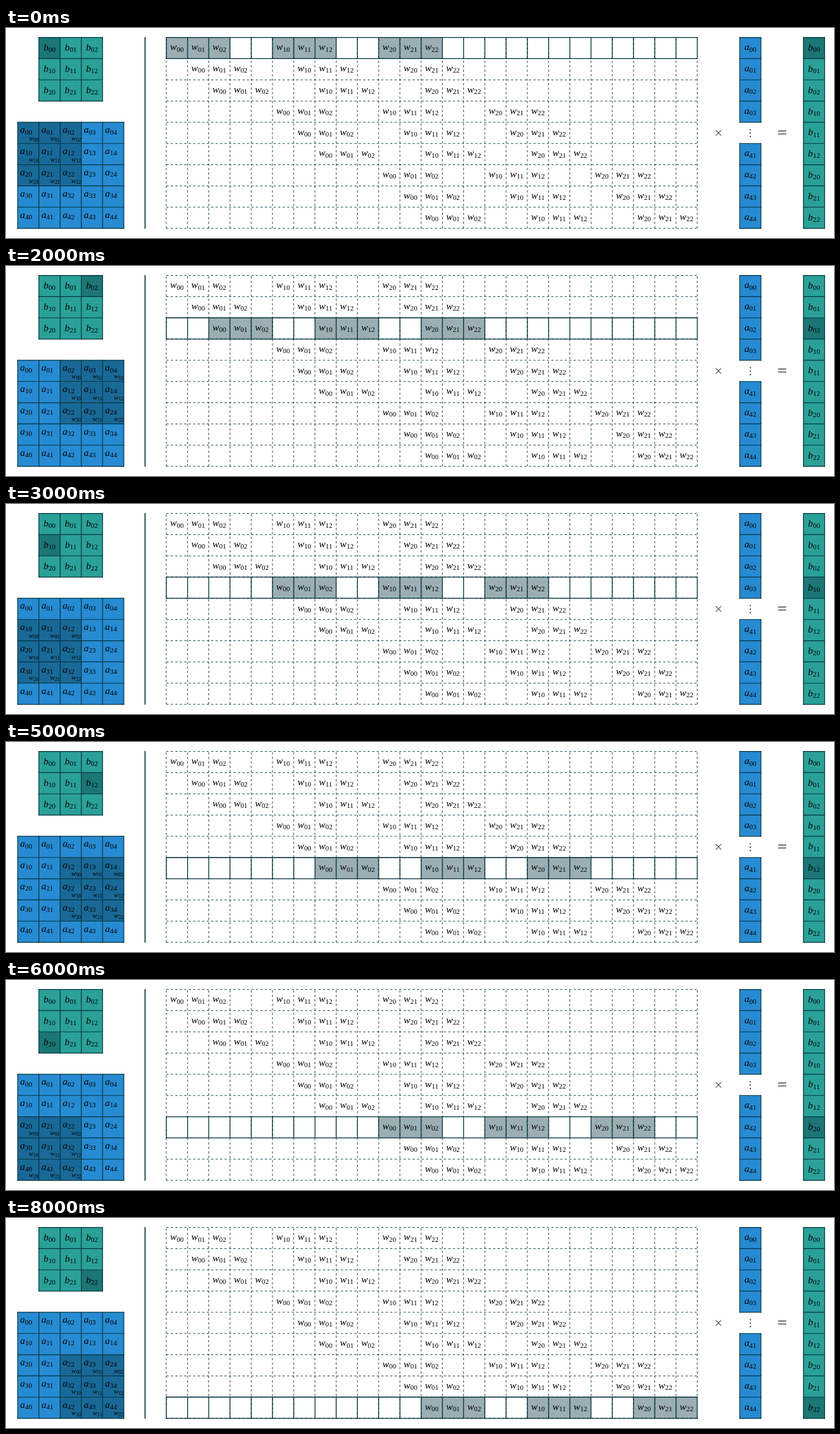
Write an HTML page with a canvas that moves like this. It is 1280x325 px and loops after 9000 ms.

```html
<!DOCTYPE html>
<html lang="en">
<head>
<meta charset="utf-8">
<title>Convolution as a matrix product</title>
<style>
  html, body { margin: 0; width: 100%; height: 100%; overflow: hidden; background: #fff; }
  canvas { display: block; }
</style>
</head>
<body>
<canvas id="stage" width="1280" height="325"></canvas>
<script>
const ctx = document.getElementById('stage').getContext('2d');
const CELL = 32.83, LEFT = 18, TOP = 14.6;
const BLUE = '#268bd2', TEAL = '#2aa198', INK = '#073642';
const SHADE = 'rgba(7, 54, 66, 0.4)';
const STEP_MS = 1000, STEPS = 9;

// Everything sits on one lattice of square cells.
const px = col => LEFT + col * CELL;
const py = row => TOP + row * CELL;
const digits = (row, col) => `${row}${col}`;

function each(rows, cols, visit) {
  for (let r = 0; r < rows; r++) for (let c = 0; c < cols; c++) visit(r, c);
}

function fill(col, row, cols, rows, color) {
  ctx.fillStyle = color;
  ctx.fillRect(px(col), py(row), cols * CELL, rows * CELL);
}

function line(x1, y1, x2, y2) {
  ctx.beginPath();
  ctx.moveTo(x1, y1);
  ctx.lineTo(x2, y2);
  ctx.stroke();
}

function grid(col, row, cols, rows, width = 1.2, dash = []) {
  ctx.strokeStyle = INK;
  ctx.lineWidth = width;
  ctx.lineCap = dash.length ? 'butt' : 'square';
  ctx.setLineDash(dash);
  for (let r = 0; r <= rows; r++) line(px(col), py(row + r), px(col + cols), py(row + r));
  for (let c = 0; c <= cols; c++) line(px(col + c), py(row + rows), px(col + c), py(row));
  ctx.setLineDash([]);
}

// Letter with a subscript; align is 0 for left, 0.5 for centre, 1 for right.
function symbol(letter, sub, x, baseline, align = 0.5, size = 15.3) {
  const letterFont = `italic ${size}px "Liberation Serif", serif`;
  const subFont = `${size * 0.71}px "Liberation Serif", serif`;
  ctx.fillStyle = '#000';
  ctx.font = subFont;
  const subWidth = ctx.measureText(sub).width;
  ctx.font = letterFont;
  const letterWidth = ctx.measureText(letter).width;
  const start = x - align * (letterWidth + subWidth);
  ctx.fillText(letter, start, baseline);
  ctx.font = subFont;
  ctx.fillText(sub, start + letterWidth, baseline + size * 0.15);
}

function cellSymbol(letter, sub, col, row) {
  symbol(letter, sub, px(col + 0.5), py(row + 0.5) + (letter === 'b' ? 4 : 3.2));
}

function drawOutputGrid(i, j) {
  fill(1, 0, 3, 3, TEAL);
  fill(1 + j, i, 1, 1, SHADE);
  grid(1, 0, 3, 3);
  each(3, 3, (r, c) => cellSymbol('b', digits(r, c), 1 + c, r));
}

function drawInputGrid(i, j) {
  fill(0, 4, 5, 5, BLUE);
  fill(j, 4 + i, 3, 3, SHADE);
  grid(0, 4, 5, 5);
  each(5, 5, (r, c) => symbol('a', digits(r, c), px(c) + 3.8, py(4 + r) + 16.4, 0));
  each(3, 3, (r, c) =>
    symbol('w', digits(r, c), px(j + c + 1) - 0.6, py(4 + i + r) + 28, 1, 10.8));
}

function drawMatrix(step) {
  const first = 7;
  const weightCol = (row, m, n) => first + 5 * (Math.floor(row / 3) + m) + row % 3 + n;
  for (let m = 0; m < 3; m++) fill(weightCol(step, m, 0), step, 3, 1, SHADE);
  grid(first, 0, 25, 9, 0.9, [3.46, 3.46]);
  grid(first, step, 25, 1, 1.3);
  for (let row = 0; row < 9; row++) {
    each(3, 3, (m, n) => cellSymbol('w', digits(m, n), weightCol(row, m, n), row));
  }
}

function drawInputVector() {
  for (const [row, a] of [[0, 0], [5, 4]]) {
    fill(34, row, 1, 4, BLUE);
    grid(34, row, 1, 4);
    for (let k = 0; k < 4; k++) cellSymbol('a', digits(a, a ? k + 1 : k), 34, row + k);
  }
}

function drawOutputVector(step) {
  fill(37, 0, 1, 9, TEAL);
  fill(37, step, 1, 1, SHADE);
  grid(37, 0, 1, 9);
  each(3, 3, (r, c) => cellSymbol('b', digits(r, c), 37, 3 * r + c));
}

function drawOperators() {
  const y = py(4.5);
  ctx.strokeStyle = INK;
  ctx.lineCap = 'butt';
  ctx.lineWidth = 1.6;
  line(px(6), py(0) - 0.5, px(6), py(9) + 0.5);

  ctx.strokeStyle = ctx.fillStyle = '#000';
  ctx.lineWidth = 1;
  const times = px(33);
  line(times - 4.3, y - 4.3, times + 4.3, y + 4.3);
  line(times - 4.3, y + 4.3, times + 4.3, y - 4.3);
  const equals = px(36);
  for (const dy of [-2.3, 2.3]) line(equals - 6.3, y + dy - 0.6, equals + 6.3, y + dy - 0.6);
  for (const dy of [-5, 0.3, 5.6]) {
    ctx.beginPath();
    ctx.arc(px(34.5), y + dy, 0.95, 0, 2 * Math.PI);
    ctx.fill();
  }
}

function draw() {
  const step = Math.floor(performance.now() / STEP_MS) % STEPS;
  const i = Math.floor(step / 3), j = step % 3;
  ctx.fillStyle = '#fff';
  ctx.fillRect(0, 0, 1280, 325);
  drawOutputGrid(i, j);
  drawInputGrid(i, j);
  drawMatrix(step);
  drawInputVector();
  drawOutputVector(step);
  drawOperators();
  requestAnimationFrame(draw);
}
draw();
</script>
</body>
</html>
```
